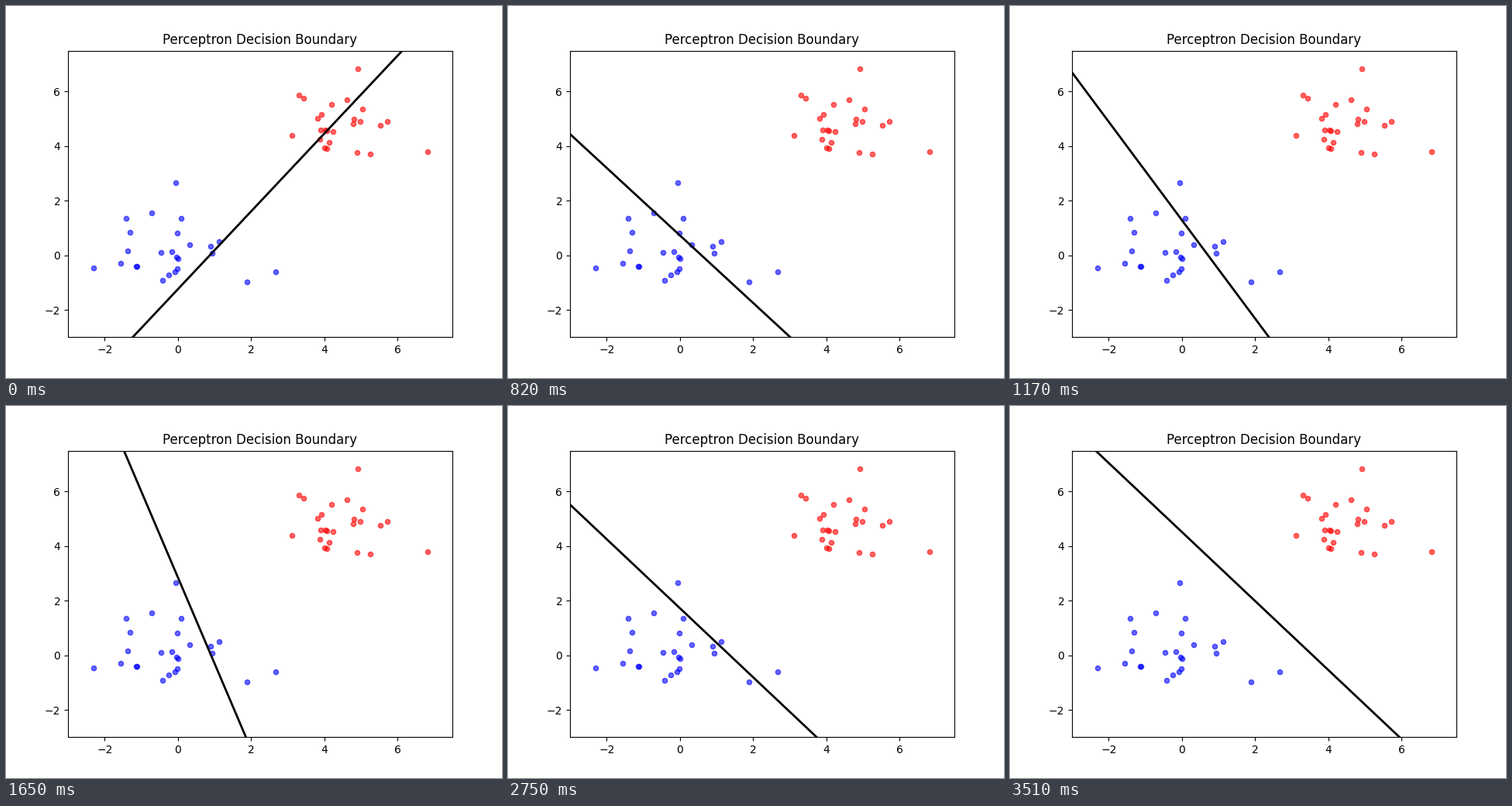
These frames come from a looping animation (640 by 480 pixels, 5700 ms). A matplotlib script:

```python
import matplotlib.pyplot as plt
import numpy as np
from matplotlib.animation import FuncAnimation

LOOP_MS, STEP_MS = 5700, 20
LOW, HIGH = -3, 7.5

# Samples that trigger weight updates
RIGHT_BLUE = (2.663, -0.594)
TOP_BLUE = (-0.053, 2.656)
UPPER_BLUE = (0.082, 1.352)
INNER_BLUE = (-0.019, 0.824)
LOW_RED = (4.892, 3.773)

BLUE = [
    (-2.31, -0.46), (-1.552, -0.284), (-1.412, 1.347), (-1.38, 0.15),
    (-1.311, 0.838), (-1.139, -0.42), (-1.116, -0.395), (-0.71, 1.557),
    (-0.46, 0.11), (-0.412, -0.915), (-0.248, -0.73), (-0.17, 0.133),
    (-0.083, -0.6), (-0.034, -0.063), (-0.015, -0.486), (0.013, -0.122),
    (0.319, 0.4), (0.904, 0.335), (0.946, 0.073), (1.132, 0.511),
    (1.881, -0.98), RIGHT_BLUE, TOP_BLUE, UPPER_BLUE, INNER_BLUE,
]
RED = [
    (3.308, 5.873), (3.446, 5.758), (3.116, 4.386), (3.82, 5.018),
    (3.929, 5.165), (3.91, 4.595), (4.038, 4.597), (4.07, 4.555),
    (4.247, 4.545), (3.878, 4.264), (4.007, 3.935), (4.08, 3.895),
    (4.137, 4.128), (4.193, 5.517), (4.625, 5.685), (4.786, 4.83),
    (4.816, 5.0), (4.979, 4.895), (5.038, 5.346), (4.926, 6.835),
    (5.529, 4.76), (5.713, 4.905), (5.247, 3.72), (6.823, 3.804), LOW_RED,
]

# Time in ms and the misclassified sample met at that time
UPDATES = [
    (190, RIGHT_BLUE), (390, LOW_RED),
    (820, INNER_BLUE), (860, UPPER_BLUE), (970, RIGHT_BLUE),
    (1140, TOP_BLUE), (1170, LOW_RED),
    (1650, UPPER_BLUE), (1760, RIGHT_BLUE), (1930, TOP_BLUE),
    (2550, RIGHT_BLUE), (2750, LOW_RED),
    (3340, RIGHT_BLUE), (3510, TOP_BLUE),
]


def weights_at(ms):
    """Perceptron weights (x, y, bias) after all updates up to ms."""
    weights = np.array([1.144, -0.802, -1.0])
    for time, sample in UPDATES:
        if time <= ms:
            label = 1 if sample in RED else -1
            weights = weights + label * np.array([*sample, 1])
    return weights


fig, ax = plt.subplots(figsize=(6.4, 4.8), dpi=100)
for samples, color in ((BLUE, "blue"), (RED, "red")):
    ax.scatter(*zip(*samples), s=20, c=color, alpha=0.6)
ax.set(xlim=(LOW, HIGH), ylim=(LOW, HIGH), title="Perceptron Decision Boundary")
xs = np.array([LOW, HIGH])
boundary, = ax.plot([], [], color="black", lw=2)


def draw(frame):
    # Half a step ahead, so switches between ticks are not late
    wx, wy, bias = weights_at((frame + 0.5) * STEP_MS)
    boundary.set_data(xs, -(wx * xs + bias) / wy)
    return boundary,


anim = FuncAnimation(fig, draw, frames=LOOP_MS // STEP_MS, interval=STEP_MS,
                     repeat=True, repeat_delay=0)
plt.show()
```
